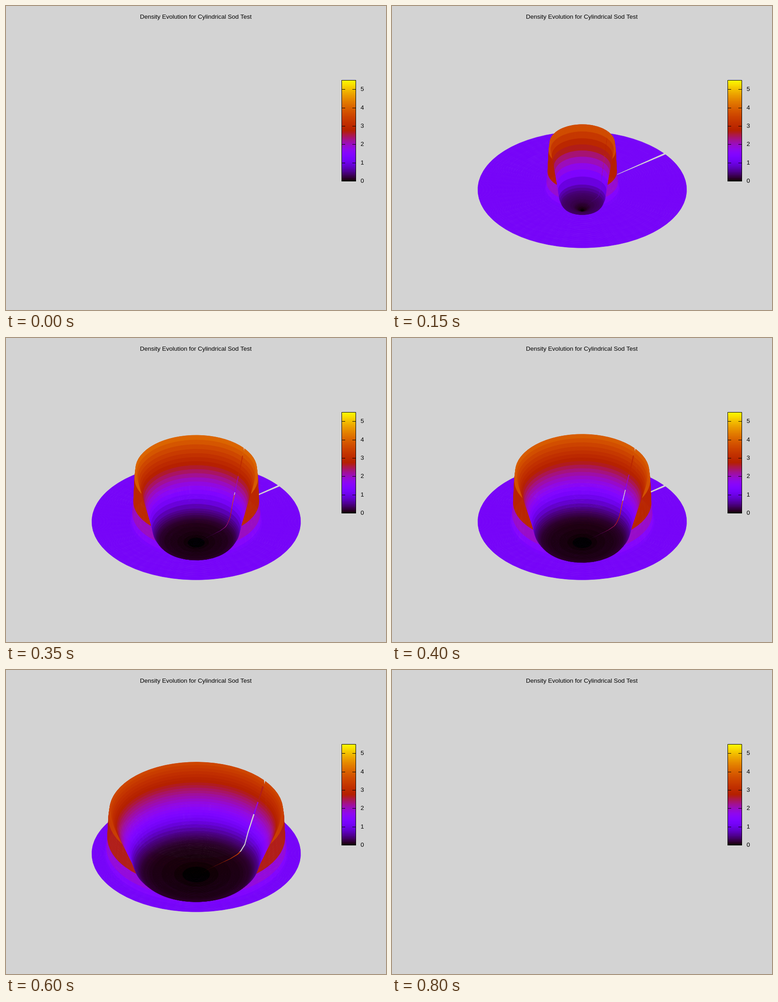
These frames come from a looping animation (837 by 669 pixels, 0.85 s). An HTML page with a canvas:

```html
<!DOCTYPE html>
<html lang="en">
<head>
<meta charset="utf-8">
<title>Density Evolution for Cylindrical Sod Test</title>
<style>
  html, body { margin: 0; width: 100%; height: 100%; overflow: hidden; background: #d3d3d3; }
  canvas { display: block; }
</style>
</head>
<body>
<canvas id="plot" width="837" height="669"></canvas>
<script>
const ctx = document.getElementById('plot').getContext('2d');
const STEP = 50, STEPS = 17;
const MAX_DENSITY = 5.5, AMBIENT = 1.2;
const CX = 419, FLOOR_Y = 451, Z_SCALE = 39, TILT = 0.5565;
const CELLS = 100, CELL = 2.3;
const SEAM = -0.662, GAP = 0.03;

// Peak density of the shell at each step, starting with step 1
const peaks = [2.2, 3.1, 3.86, 4.3, 4.5, 4.35, 4.17, 4.03, 3.92, 3.82, 3.73, 3.64, 3.55, 3.47, 3.45];
// [radius / shell radius, density / peak] behind the shock
const inner = [[0, 0], [.13, .003], [.17, .008], [.3, .014], [.5, .022], [.61, .043],
  [.65, .07], [.71, .145], [.757, .31], [.85, .57], [.943, .82], [1, 1]];
// [cells ahead of the peak, share of the jump]
const outer = [[0, 1], [1, .83], [2, .38], [3, .16], [4, .05], [5, 0]];

function lerpTable(table, x) {
  const i = table.findIndex(p => p[0] >= x);
  if (i < 0) return table[table.length - 1][1];
  if (i === 0) return table[0][1];
  const [x0, y0] = table[i - 1], [x1, y1] = table[i];
  return y0 + (y1 - y0) * (x - x0) / (x1 - x0);
}

function palette(density) {
  const v = Math.floor(Math.min(1, density / MAX_DENSITY) * 256) / 256;
  const blue = Math.max(0, Math.sin(2 * Math.PI * v));
  return `rgb(${[Math.sqrt(v), v ** 3, blue].map(c => Math.round(c * 255))})`;
}

function densityProfile(step) {
  const shell = 70.5 + 15.2 * (step - 3) - 0.43 * (step - 3) * (step - 8);
  const shellCell = Math.round(shell / CELL);
  const peak = peaks[step - 1];
  const residue = 0.25 * Math.exp(3 - step);
  return Array.from({ length: CELLS + 1 }, (_, i) => {
    if (i > shellCell) return AMBIENT + (peak - AMBIENT) * lerpTable(outer, i - shellCell);
    const s = i / shellCell;
    return peak * lerpTable(inner, s) + residue * Math.sin(Math.PI * s);
  });
}

function band(r0, z0, r1, z1) {
  const from = SEAM + GAP / 2, to = SEAM + 2 * Math.PI - GAP / 2;
  ctx.beginPath();
  ctx.ellipse(CX, FLOOR_Y - z0 * Z_SCALE, r0, r0 * TILT, 0, from, to);
  ctx.ellipse(CX, FLOOR_Y - z1 * Z_SCALE, r1, r1 * TILT, 0, to, from, true);
  ctx.closePath();
  ctx.fill();
  ctx.stroke();
}

// Rings are painted from the rim inwards, so inner ones cover outer ones
function drawSurface(step) {
  const z = densityProfile(step);
  ctx.lineWidth = 0.8;
  ctx.lineJoin = 'bevel';
  for (let i = CELLS; i > 0; i--) {
    const dz = z[i - 1] - z[i];
    const parts = Math.max(1, Math.ceil(Math.abs(dz) * Z_SCALE / 3));
    ctx.fillStyle = ctx.strokeStyle = palette((z[i] + z[i - 1]) / 2);
    for (let p = 0; p < parts; p++) {
      const a = p / parts, b = (p + 1) / parts;
      band((i - a) * CELL, z[i] + dz * a, (i - b) * CELL, z[i] + dz * b);
    }
  }
}

function drawColorbar() {
  const left = 739, top = 163, width = 31, height = 222;
  for (let y = 0; y < height; y++) {
    ctx.fillStyle = palette((1 - y / height) * MAX_DENSITY);
    ctx.fillRect(left, top + y, width, 1);
  }
  ctx.strokeStyle = ctx.fillStyle = '#000';
  ctx.lineWidth = 1;
  ctx.strokeRect(left + 0.5, top + 0.5, width, height);
  ctx.textAlign = 'left';
  for (let v = 0; v <= 5; v++) {
    const y = Math.round(top + height * (1 - v / MAX_DENSITY));
    ctx.fillRect(left, y, 8, 1);
    ctx.fillRect(left + width - 7, y, 8, 1);
    ctx.fillText(v, 781, y + 4);
  }
}

function draw(step) {
  ctx.fillStyle = '#d3d3d3';
  ctx.fillRect(0, 0, 837, 669);
  if (step > 0 && step < STEPS - 1) drawSurface(step);
  ctx.font = '13.5px "Liberation Sans", Arial, sans-serif';
  ctx.fillStyle = '#000';
  ctx.textAlign = 'center';
  ctx.fillText('Density Evolution for Cylindrical Sod Test', 418, 28);
  drawColorbar();
}

const start = performance.now();
let shown = -1;
function tick() {
  const step = Math.floor((performance.now() - start) / STEP) % STEPS;
  if (step !== shown) draw(shown = step);
  requestAnimationFrame(tick);
}
tick();
</script>
</body>
</html>
```
